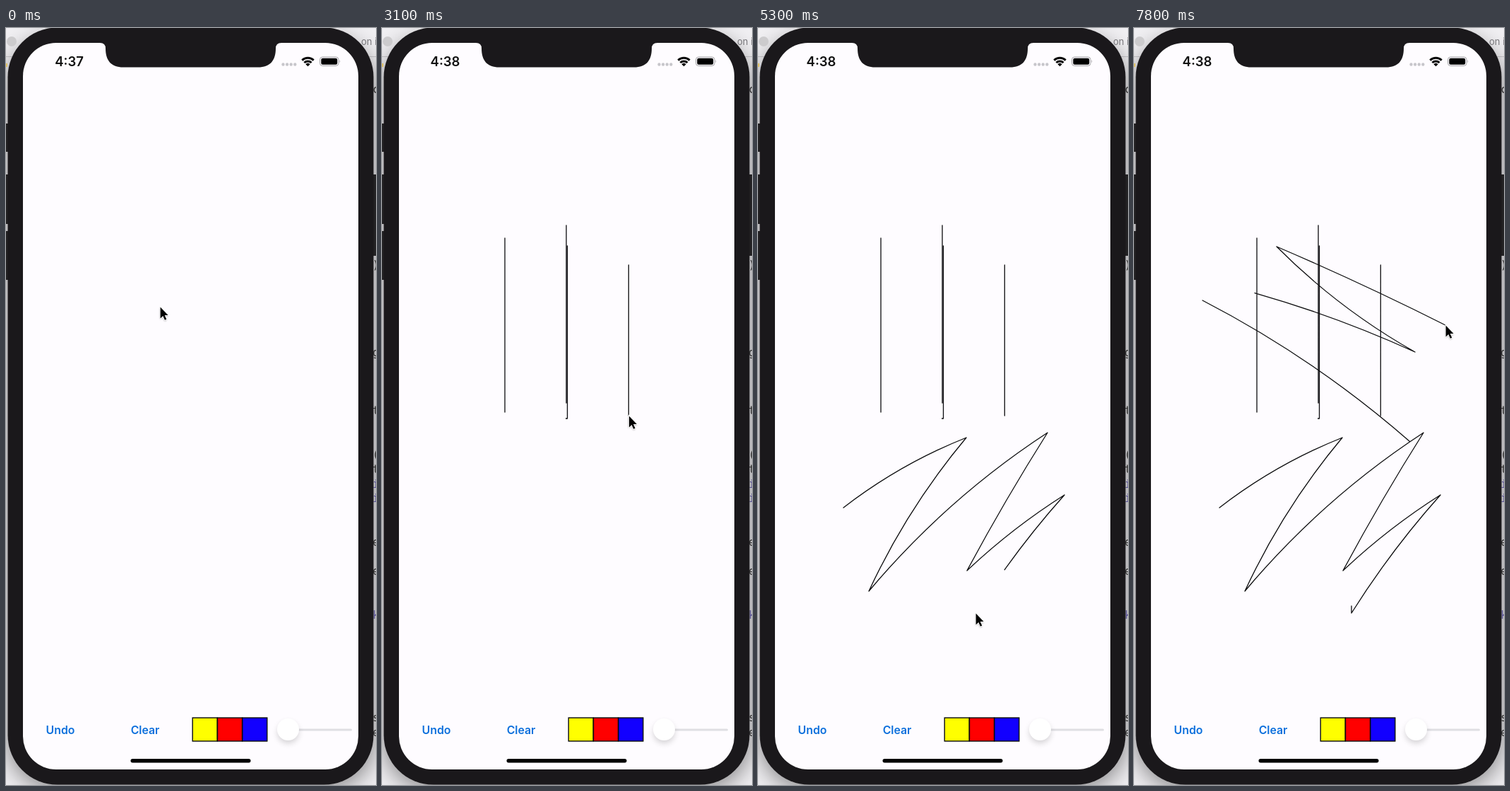
Animation, 524 px wide and 1070 px high, one loop 8000 ms. Source, as an HTML page:

```html
<!DOCTYPE html>
<html lang="en">
<head>
<meta charset="utf-8">
<title>Drawing app</title>
<style>
  html, body { margin: 0; height: 100%; overflow: hidden; background: #dddce0; }
  svg { display: block; width: 100vw; height: 100vh; font-family: Inter, Roboto, sans-serif; }
  .button { font-size: 15.8px; font-weight: 600; fill: #0b6fdc; text-anchor: middle; }
  .code { font: 16px "DejaVu Sans Mono", monospace; }
</style>
</head>
<body>
<svg viewBox="0 0 524 1070">
  <defs>
    <filter id="glow" x="-20%" y="-20%" width="140%" height="140%"><feGaussianBlur stdDeviation="16"/></filter>
    <filter id="soft" x="-50%" y="-50%" width="200%" height="200%"><feGaussianBlur stdDeviation="4"/></filter>
    <filter id="faint" x="-50%" y="-50%" width="200%" height="200%"><feGaussianBlur stdDeviation="1"/></filter>
  </defs>

  <!-- desktop behind the phone -->
  <rect width="524" height="1070" fill="#f0eff2"/>
  <rect y="40" width="524" height="1" fill="#c9c8cc"/>
  <rect x="2" y="14" width="520" height="1062" rx="70" opacity=".45" filter="url(#glow)"/>
  <circle cx="8" cy="19" r="7" fill="#cccbcd"/>
  <rect y="50" width="2" height="5" fill="#e2c56a"/>
  <text x="503" y="24" font-size="13" fill="#77767a">on i</text>
  <g id="letters" class="code"></g>
  <g fill="#222123">
    <rect y="135" width="6" height="40"/>
    <rect y="207" width="6" height="70"/>
    <rect y="287" width="6" height="69"/>
    <rect x="516" y="207" width="8" height="115"/>
  </g>

  <!-- phone -->
  <rect x="2.5" y="-.5" width="518" height="1070" rx="70" fill="#1a181b"/>
  <rect x="24" y="21" width="475" height="1027" rx="47" fill="#fefcff"/>
  <path d="M133 20V21Q141 21 141 29C141 46 149 55.5 166 55.5H357C374 55.5 382 46 382 29Q382 21 390 21V20Z" fill="#1a181b"/>

  <!-- status bar -->
  <text id="clock" x="89.5" y="54" font-size="18.5" font-weight="600" fill="#111" text-anchor="middle">4:37</text>
  <path d="M392.5 51.5h17" stroke="#c7c6cb" stroke-width="4.4" stroke-linecap="round" stroke-dasharray="0 5.6"/>
  <g fill="none" stroke="#0a0a0a" stroke-width="2.9">
    <path d="M419.3 45.6a11.8 11.8 0 0 1 16.4 0"/>
    <path d="M422.4 49a7.4 7.4 0 0 1 10.2 0"/>
  </g>
  <path d="M424.4 51.2a4.5 4.5 0 0 1 6.2 0L427.5 54.3Z"/>
  <rect x="444.5" y="41" width="26.5" height="12.5" rx="3.8" fill="none" stroke="#a3a2a6"/>
  <rect x="446.3" y="42.8" width="22.9" height="8.9" rx="2.2"/>
  <path d="M472.5 45q1.8 2.2 0 4.4z" fill="#a3a2a6"/>

  <!-- toolbar -->
  <text class="button" x="77" y="997.5">Undo</text>
  <text class="button" x="197" y="997.5">Clear</text>
  <g stroke="#0a0a0a" stroke-width="1.4">
    <rect x="264.2" y="975" width="35" height="33" fill="#ff0"/>
    <rect x="299.5" y="975" width="35" height="33" fill="#f00"/>
    <rect x="334.8" y="975" width="35" height="33" fill="#1200ff"/>
  </g>
  <path d="M400 992H488.5" stroke="#e0dfe3" stroke-width="3" stroke-linecap="round"/>
  <circle cx="399.5" cy="996" r="15" opacity=".17" filter="url(#soft)"/>
  <circle cx="399.5" cy="991.5" r="15.5" fill="#fff"/>
  <rect x="176.5" y="1033" width="170" height="5.5" rx="2.75"/>

  <path id="ink" fill="none" stroke="#0c0c0e" stroke-width="1.3" stroke-linecap="round" stroke-linejoin="round"/>
  <g id="cursor">
    <path d="M0 1V18L4 14.5L6.6 20.5L9.6 19L7 13.4H12.4Z" opacity=".35" filter="url(#faint)"/>
    <path d="M.6 .6V16.4L4.3 13L6.9 18.8L9.3 17.7L6.7 12.1H11.6Z" stroke="#fff" stroke-width="1.8" paint-order="stroke"/>
  </g>
</svg>
<script>
const $ = id => document.getElementById(id);
const STEP = 100, LOOP = 8000, MINUTE_TURNS = 27;

const mix = (a, b, k) => [a[0] + (b[0] - a[0]) * k, a[1] + (b[1] - a[1]) * k];
const ease = u => u * u * (3 - 2 * u);

// The pointer's route: legs that bow sideways by `bend` pixels at their middle.
const legs = [];
let here = [218, 394], now = 0;
const leg = pen => (x, y, end, bend = 0) => {
  const to = [x, y], dx = x - here[0], dy = y - here[1];
  const bow = 2 * bend / Math.hypot(dx, dy);
  const [mx, my] = mix(here, to, .5);
  legs.push({ pen, from: here, to, control: [mx - dy * bow, my + dx * bow], start: now, end });
  here = to;
  now = end;
};
const move = leg(false), draw = leg(true);
const waitUntil = step => now = step;

// upright bars
move(174, 297, 5);
draw(174, 543, 10.2);
move(261, 279, 15, 36);
waitUntil(16);
draw(261, 530, 19);
move(262.5, 308, 19.8);
draw(262.5, 552, 22.4);
draw(260.5, 552, 23);
move(349.3, 335, 27);
draw(349.3, 548, 30);
waitUntil(32);

// lower zigzag
move(121, 678, 36);
draw(295, 579, 39.8, -7);
draw(157, 796, 41.8, 8.5);
draw(410, 572, 44.8, -12.5);
draw(296, 767, 47, 2);
draw(434, 660, 50.5, -4.2);
draw(308, 827, 53, 4.4);
draw(308, 817, 54);
waitUntil(56);

// slashes across the bars
move(97, 385, 61);
draw(390, 584, 64.7, -10.7);
move(171, 374.5, 68);
draw(398, 458, 71, -4.5);
draw(202, 309, 74, -8.5);
draw(441, 420, 77, -2);

// The part of a leg covered by a given step, itself a quadratic curve
function covered({ from, control, to, start, end }, step) {
  const k = ease(Math.min(1, (step - start) / (end - start)));
  const bendPoint = mix(from, control, k);
  return { from, bendPoint, tip: mix(bendPoint, mix(control, to, k), k) };
}

function inkAt(step) {
  return legs.filter(l => l.pen && l.start <= step).map(l => {
    const { from, bendPoint, tip } = covered(l, step);
    return `M${from}Q${bendPoint} ${tip}`;
  }).join("");
}

// Edge of the code editor beside the phone, one character per line
$("letters").innerHTML = [..."c...........).....g...t..(tii..e.e..k......se"].map((char, row) =>
  char === "." ? "" :
  `<text x="519" y="${92 + row * 20.65}" fill="${/[ik]/.test(char) ? "#5a5494" : "#333"}">${char}</text>`
).join("");

function render() {
  const step = Math.floor(performance.now() % LOOP / STEP);
  const current = legs.findLast(l => l.start <= step);
  $("cursor").setAttribute("transform", `translate(${covered(current, step).tip})`);
  $("ink").setAttribute("d", inkAt(step - 1)); // ink trails the pointer by one step
  $("clock").textContent = step < MINUTE_TURNS ? "4:37" : "4:38";
  requestAnimationFrame(render);
}
render();
</script>
</body>
</html>
```
